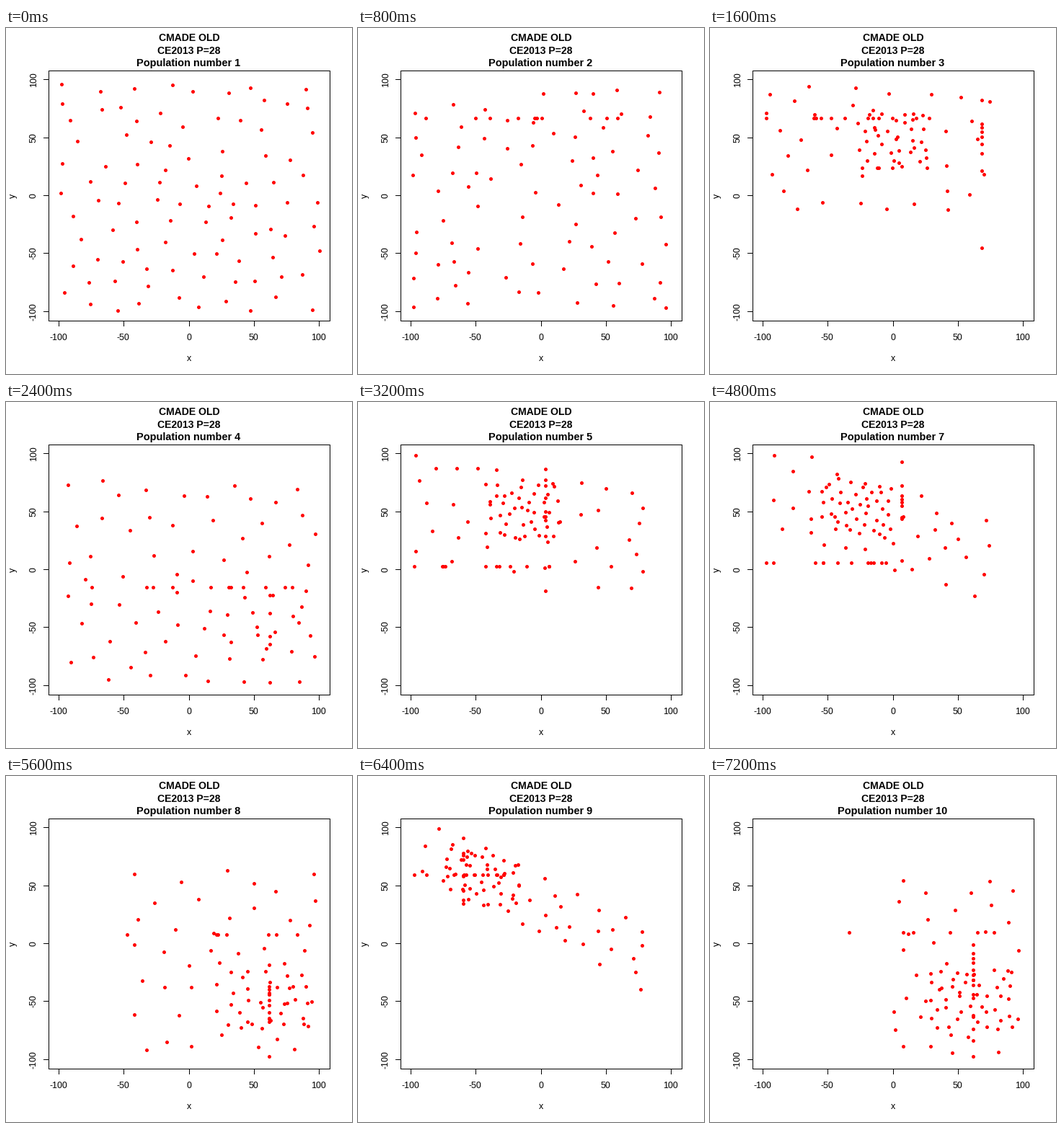
A matplotlib script that plays this animation: 480x480 px, repeating every 8 s.

```python
import numpy as np
import matplotlib.pyplot as plt
from matplotlib.animation import FuncAnimation
from matplotlib.patches import Rectangle

SIZE = 480
LEFT, RIGHT, TOP, BOTTOM = 59, 449, 59, 406
SPAN = 216  # both axes run from -108 to 108
STEP_MS = 800
GENERATIONS = 10

# Generation: (y shared by a row of points, x shared by a column)
SHARED = {2: (67.5, 61), 3: (67, 68), 4: (-15, 62), 5: (3, 3), 6: (5, 62),
          7: (6.5, 6.5), 8: (8, 61), 9: (60, -60), 10: (10, 61)}


def to_x(x):
    return (LEFT + RIGHT) / 2 + np.asarray(x) * (RIGHT - LEFT) / SPAN


def to_y(y):
    return (TOP + BOTTOM) / 2 - np.asarray(y) * (BOTTOM - TOP) / SPAN


def cloud(rng, center, radii, count, slope=0):
    """Evenly spread random points in a sheared box, inside +-100."""
    points = np.empty((0, 2))
    while len(points) < count:
        tries = rng.uniform(-1, 1, (10, 2)) * radii
        tries[:, 1] += slope * tries[:, 0]
        tries += center
        tries = tries[np.abs(tries).max(axis=1) <= 100]
        if not len(tries):
            continue
        gaps = np.linalg.norm(tries[:, None] - points, axis=2)
        best = gaps.min(axis=1, initial=1e3).argmax()
        points = np.vstack([points, tries[best]])
    return points


def row(rng, y, low, mode, high, count):
    xs = np.append(rng.triangular(low, mode, high, count - 1), low)
    return np.column_stack([xs, np.full(count, y)])


def column(rng, x, low, mode, high, count):
    return row(rng, x, low, mode, high, count)[:, ::-1]


def upper_belt(rng, generation):
    """Odd generations gather along a falling belt at the upper left."""
    t = (generation - 3) / 6
    y, x = SHARED[generation]
    return [row(rng, y, -98, -15 - 45 * t, 90 - 100 * t, 12),
            column(rng, x, -45 + 80 * t, 65, 97, 9),
            cloud(rng, (-45 * t, 48 + 10 * t), (28, 24), 34, -0.3 * t),
            cloud(rng, (-10, 40), (88, 55 - 27 * t), 40, -0.6 * t)]


def lower_corner(rng, generation):
    """Even generations close in on the lower right."""
    s = (generation - 2) / 8
    y, x = SHARED[generation]
    low, high = -100 + 100 * s ** 2, 92 - 37 * s
    parts = [row(rng, y, -89 + 55 * s, 60, 90, round(10 - 4 * s)),
             cloud(rng, (60, -48), (32, 26), round(36 * s)),
             cloud(rng, ((low + 98) / 2, (high - 97) / 2),
                   ((98 - low) / 2, (high + 97) / 2), round(80 - 44 * s))]
    if s > 0:
        parts.append(column(rng, x, -97, -45, 20, round(16 * s)))
    return parts


def population(generation):
    rng = np.random.default_rng(generation)
    if generation == 1:
        parts = [cloud(rng, (0, 0), (100, 100), 95)]
    elif generation % 2:
        parts = upper_belt(rng, generation)
    else:
        parts = lower_corner(rng, generation)
    x, y = np.vstack(parts).T
    return np.floor(to_x(x)) + 0.5, np.floor(to_y(y)) + 0.5


populations = [population(g + 1) for g in range(GENERATIONS)]

plt.rcParams["font.family"] = "Liberation Sans"
fig = plt.figure(figsize=(SIZE / 72, SIZE / 72), dpi=72, facecolor="white")
ax = fig.add_axes([0, 0, 1, 1])
ax.set(xlim=(0, SIZE), ylim=(SIZE, 0))
ax.axis("off")


def label(x, y, text, size=12.4, weight="normal", turn=0):
    return ax.text(x, y, text, size=size, weight=weight, rotation=turn,
                   rotation_mode="anchor", ha="center", va="baseline")


def line(xs, ys):
    ax.plot(xs, ys, color="black", lw=1, antialiased=False)


# Whole-number coordinates snap to the centre of their pixel.
ax.add_patch(Rectangle((LEFT, TOP), RIGHT - LEFT, BOTTOM - TOP,
                       fill=False, ec="black", lw=1, antialiased=False))
for value in range(-100, 101, 50):
    x, y = np.floor(to_x(value)), np.floor(to_y(value))
    line((x, x), (BOTTOM, BOTTOM + 7))
    line((LEFT - 7, LEFT), (y, y))
    label(x - 0.5, 433, str(value))
    label(42, y + 0.5, str(value), turn=90)

label(253.5, 462, "x")
label(13, 232.5, "y", turn=90)
label(254, 18, "CMADE OLD", 14, "bold")
label(254, 36, "CE2013 P=28", 14, "bold")
counter = label(253.5, 53, "", 14.5, "bold")
dots, = ax.plot([], [], "o", color="#ff0000", ms=5, mew=0, antialiased=False)


def draw(i):
    dots.set_data(*populations[i])
    counter.set_text(f"Population number {i + 1}")
    return dots, counter


anim = FuncAnimation(fig, draw, frames=GENERATIONS, interval=STEP_MS,
                     repeat=True, repeat_delay=0)
plt.show()
```
